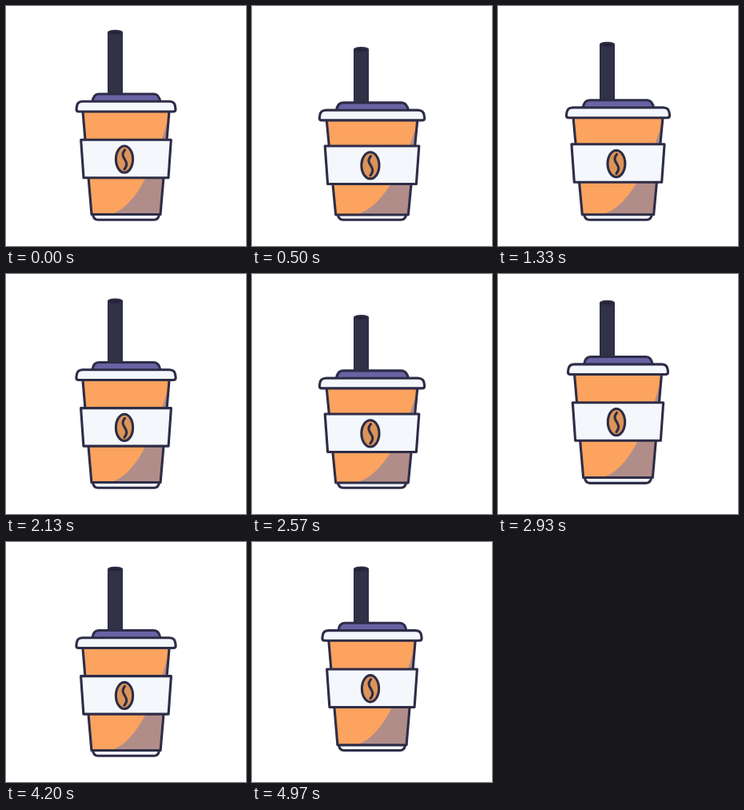
Write an HTML page that moves like this. It is 300 px wide and 300 px high and loops after 5000 ms.

```html
<!DOCTYPE html>
<html lang="en">
<head>
<meta charset="utf-8">
<title>Bouncing coffee cup</title>
<style>
  /* --squash: 1 = fully pressed down; --jump: 1 = top of the hop */
  @property --squash { syntax: "<number>"; inherits: true; initial-value: 0; }
  @property --jump { syntax: "<number>"; inherits: true; initial-value: 0; }

  html, body { margin: 0; width: 100%; height: 100%; overflow: hidden; background: #fff; }
  svg { display: block; width: 100%; height: 100%; }

  .cup {
    fill: #f4f8fd;
    stroke: #2e2d47;
    stroke-width: 3.1;
    stroke-linejoin: round;
    stroke-linecap: round;
    animation: bounce 5s cubic-bezier(.33, 0, .67, 1) infinite;
  }
  .cup * { vector-effect: non-scaling-stroke; }
  .cup > g { transform-origin: 150px 267px; }

  .straw { transform: translateY(calc(var(--squash) * 21.5px)); }
  .top {
    transform: translateY(calc(var(--squash) * 11px - var(--jump) * 9.5px))
               scaleX(calc(1 + var(--squash) * .06));
  }
  .body {
    transform: translateY(calc(var(--jump) * -7px))
               scale(calc(1 + var(--squash) * .055), calc(1 - var(--squash) * .07 + var(--jump) * .014));
  }
  .base {
    transform: translateY(calc(var(--jump) * -7px))
               scaleX(calc(1 + var(--squash) * .03));
  }
  .sleeve {
    transform: translateY(calc(var(--squash) * 7.8px - var(--jump) * 9px))
               scaleX(calc(1 + var(--squash) * .045));
  }

  .orange { fill: #fca35f; }
  .shade { fill: #b08d89; stroke: none; }
  .purple { fill: #6963a5; }
  .bean { fill: #dc9458; }
  .line { fill: none; }

  /* Two whole bounces, then a third cut off in the air */
  @keyframes bounce {
    0%, 30.667%, 41.333%, 72%, 82.667% { --squash: 0; --jump: 0; }
    10.667%, 11.333%, 21.333%, 24.333%,
    52%, 52.667%, 62.667%, 65.667%,
    93.333%, 94% { --squash: 1; --jump: 0; }
    16%, 57.333% { --squash: 0; --jump: 1; }
    98.667% { --squash: 0; --jump: 1; animation-timing-function: cubic-bezier(.4, 0, .8, .5); }
    100% { --squash: .13; --jump: .87; }
  }
</style>
</head>
<body>
<svg viewBox="0 0 300 300">
  <g class="cup">
    <g class="straw">
      <path fill="#323247" stroke-width="2" d="M128 33V128H145V33Z"/>
      <ellipse fill="#242335" stroke-width="2" cx="136.5" cy="33.3" rx="8.5" ry="2.6"/>
    </g>
    <g class="base">
      <path d="M108.5 260.5H191.5Q190.5 267.3 185 267.3H115Q109.5 267.3 108.5 260.5Z"/>
    </g>
    <g class="body">
      <path class="orange" stroke="none" d="M95 120H205L193 260.5H107Z"/>
      <path class="shade" d="M205 133C192 182 164 259 126 260.5H193Z"/>
      <path class="line" d="M95 120H205L193 260.5H107Z"/>
    </g>
    <g class="top">
      <path class="purple" d="M108 120Q109 110 116 110H185Q191 110 193 120Z"/>
      <path d="M96 119.3H204Q210.5 119.3 211.4 125L212 129Q212 132 209 132H91Q88 132 88 129L88.600 125Q89.500 119.3 96 119.3Z"/>
    </g>
    <g class="sleeve">
      <path d="M93.700 167.300H206.300L203 214.800H97Z"/>
      <ellipse class="bean" cx="148" cy="191.600" rx="10.600" ry="16.600"/>
      <path class="line" d="M148.500 180C140 190 157 193 148 204"/>
    </g>
  </g>
</svg>
</body>
</html>
```
